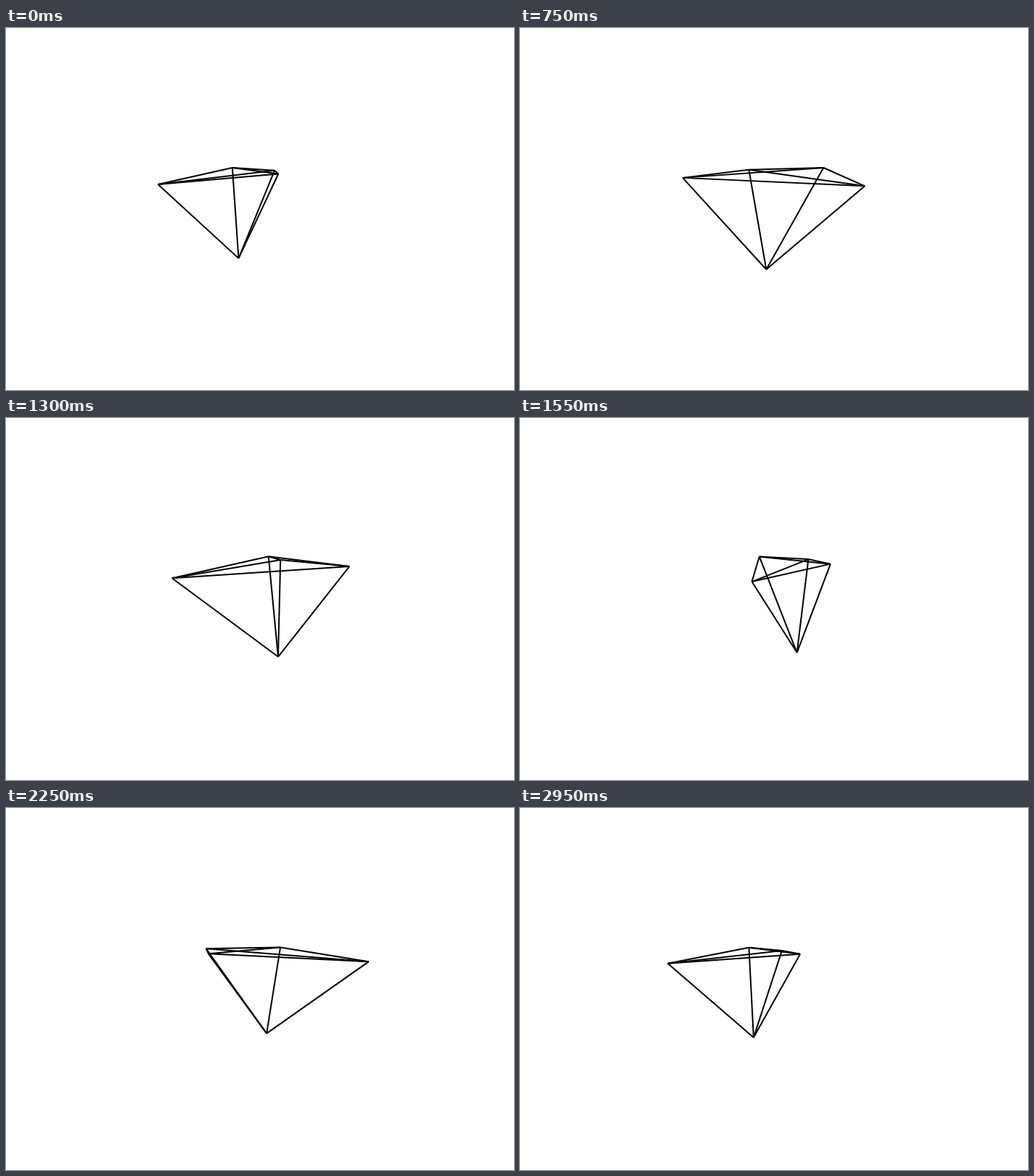
Recreate the animation shown at these times as an HTML page with a canvas. Size 700x500 px, loop 3000 ms.

```html
<!DOCTYPE html>
<html>
<head>
<meta charset="utf-8">
<style>
  html, body { margin: 0; width: 100%; height: 100%; overflow: hidden; background: #fff; }
  canvas { display: block; }
</style>
</head>
<body>
<canvas id="stage" width="700" height="500"></canvas>
<script>
const ctx = document.getElementById("stage").getContext("2d");
const centerX = 350, horizon = 179, focal = 392;
const loop = 3000, step = 50;

// Each vertex: orbit radius, drop below the horizon, angle at which it is nearest
const vertices = [
  [141, 28.5, 50],
  [51.5, 15, 127],
  [73, 14.6, 347],
  [141, 30.3, 194],
  [31.8, 142.6, 108],
];

function project([radius, drop, nearest], degrees) {
  const a = (degrees - nearest) * Math.PI / 180;
  const depth = 1 - radius / focal * Math.cos(a);
  return [centerX + radius * Math.sin(a) / depth, horizon + drop / depth];
}

function draw(time) {
  const degrees = Math.floor(time % loop / step) * step * 360 / loop;
  const points = vertices.map(v => project(v, degrees));
  ctx.clearRect(0, 0, 700, 500);
  ctx.lineWidth = 2;
  points.forEach((p, i) => {
    for (const q of points.slice(i + 1)) {
      ctx.beginPath();
      ctx.moveTo(...p);
      ctx.lineTo(...q);
      ctx.stroke();
    }
  });
}

const start = performance.now();
function tick() {
  draw(performance.now() - start);
  requestAnimationFrame(tick);
}
tick();
</script>
</body>
</html>
```
